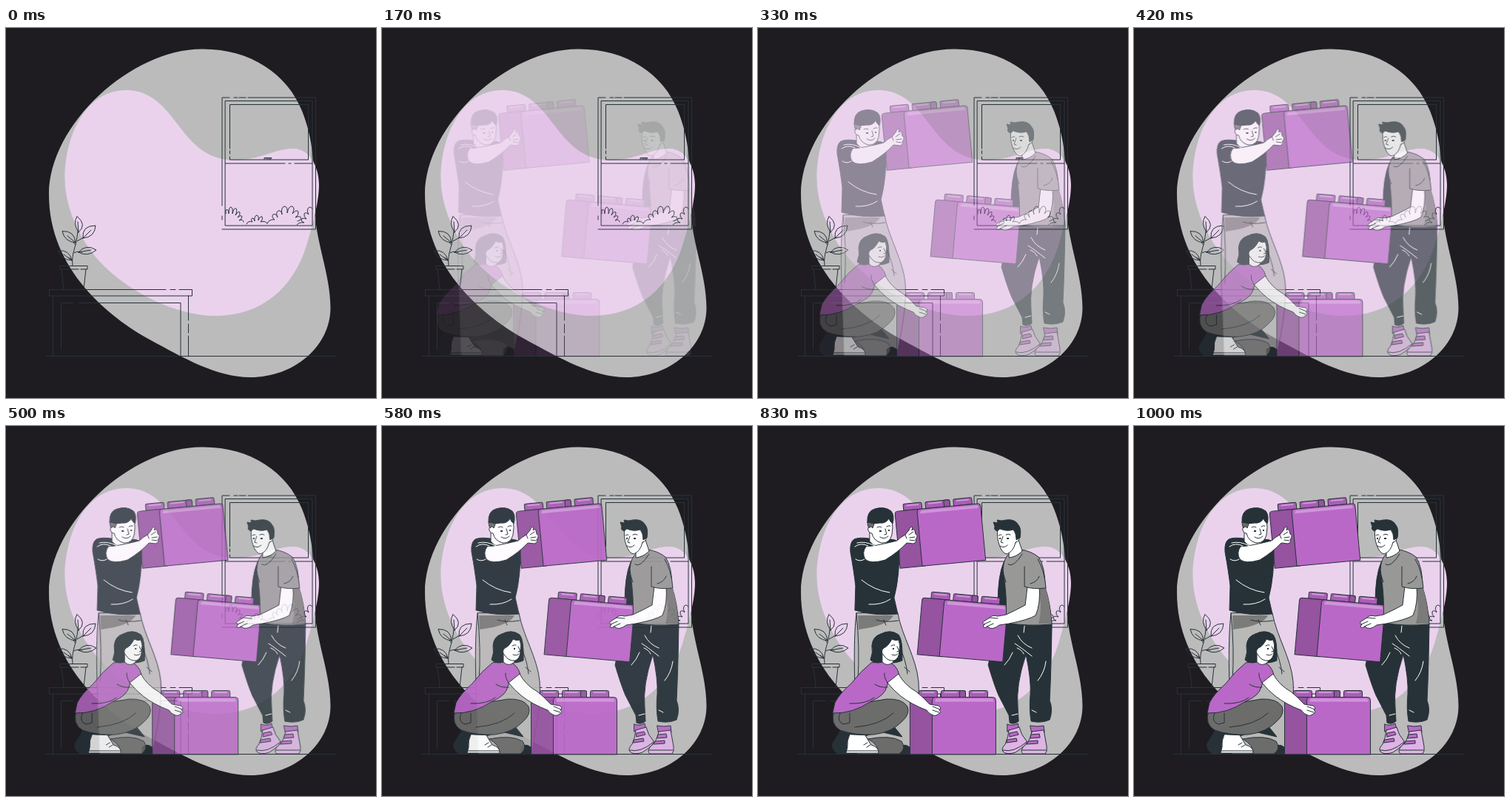
An HTML page for the animation above (1040 ms loop, 500 by 500 pixels).

```html
<!DOCTYPE html>
<html lang="en">
<head>
<meta charset="utf-8">
<title>Building together</title>
<style>
html, body { margin: 0; height: 100%; overflow: hidden; background: #1e1c21 }
svg { display: block; width: 100%; height: 100% }
g { stroke-linecap: round; stroke-linejoin: round }
.ink { fill: none; stroke: #263238 }
.art { stroke: #263238; fill: none }
.dark { fill: #263238 }
.skin { fill: #fff }
.purple { fill: #ba68c8 }
.deep { fill: #9553a0 }
.stud { fill: #a85eb5 }
.lilac { fill: #ddb4e4 }
.pale { fill: #b9b9b8 }
.grey { fill: #989897 }
.shade { fill: #7b7b7a; stroke: none }
.slate { fill: #6c6c6b }
.fold { fill: none; stroke: #fff }
.shine { fill: #cf95d9; stroke: none }
.dot { fill: #263238; stroke: none }
</style>
</head>
<body>
<svg viewBox="0 0 500 500">
<defs>
  <g id="brick">
    <path class="stud" d="M12 0v-7q0-2 2-2h21q2 0 2 2v7zM42 0v-7q0-2 2-2h29q2 0 2 2v7zM80 0v-7q0-2 2-2h21q2 0 2 2v7z"/>
    <path class="deep" d="M67 0v-7q0-2 2-2h4q2 0 2 2v7z"/>
    <path class="shine" d="M16-7.500h17v2h-17zM46-7.500h18v2h-18zM84-7.500h17v2h-17z"/>
    <path class="deep" d="M0 77V4q0-4 4-4h30v77z"/>
    <path class="purple" d="M30 77V4q0-4 4-4h78q4 0 4 4v73z"/>
    <path class="shine" d="M34 6q0-4 3-4h73q3 0 3 4z"/>
  </g>
</defs>

<path fill="#bbb" d="M265 28.500C330 28 380 62 400 112C416 152 417 190 417 235C416 285 438.500 330 438.500 378C438.500 430 390 472 330 472C285 472 240 446 194 421C140 391 58 327 58 225C58 130 170 28 265 28.500Z"/>
<path fill="#ead2ed" d="M162 84C232 84 232 178 308 178.500C345 178.500 362 163 388 163C412 163 423 190 423 212C423 235 414 268 406 294C388 352 345 389 283 389C230 389 165 357 126 315C98 284 79.500 240 79.500 203C79.500 150 105 84 162 84Z"/>

<g class="ink">
  <path d="M54 443.500H446"/>
  <!-- table -->
  <path d="M216 353.500H58.500V362H251.500V353.500H234M222 353.500h7M63.500 362v81M74.500 435V371.500H91M98 371.500H236V443M246.500 362v33M246.500 400v12M246.500 416v27"/>
  <!-- plant -->
  <path d="M73 326V321.500h37V326H101M73 326H84M87 326h11M75 326l3 27M108 326l-3 27M90 321C88 303 95 298 97 275M89 313l-5-3M92 304Q96 301 103 303M94 293l-3-3M96 288l9-5"/>
  <path d="M98 276Q90 264 96 254.500Q110 266 98 276ZM98 276L97 262M94 290Q79 289 76 274.500Q93 274 94 290ZM94 290L83 281M104 284Q102 267 121 267Q120 283 104 284ZM104 284L115 273M98 303Q108 291 122 300Q110 310 98 303ZM98 303L115 300M89 314Q74 313 70 301Q86 299 89 314ZM89 314L78 306"/>
  <!-- window -->
  <path d="M292 240V94H302M308 94h5M315 94h9M327 94H418.500V272H292M292 254v5M296.500 98.500H414V267H296.500ZM302.500 163V103.500H408.500V178H302.500V174M302.500 166v4M296.500 183H377M382 183h3M390 183H414M349 178V175.500h10L357 178M351 177h6"/>
  <!-- bushes -->
  <path d="M297 251v-5q4-2 4 5q0-9 3-9q3 1 2 9q2-9 5-7q2 3-1 9q4-6 6-4q1 3-3 7q5-4 6-1q0 3-4 5q6-2 6 2M325 265q2-5 8-3q-3-4 0-5q3 0 3 4q-1-7 3-8q3 1 2 7q2-6 5-5q2 3-2 7q6-2 9 2M353 264q3-6 10-5q-5-4-2-7q4-2 6 4q-3-7 1-9q4-1 5 5q-2-9 3-11q5 0 4 9q2-10 7-9q4 3 0 10q5-6 8-3q1 5-4 8q7-3 8 1q0 3-5 4M414 244q-4-4-6 0q-2 3 1 8q-4-4-6-1q-1 4 3 7q-6-2-7 1q0 3 4 4q-7-1-10 3"/>
</g>

<g class="art" data-from="-30">
  <!-- standing on the left -->
  <path class="pale" d="M131 253C126 300 129 350 132 443H203C211 408 217 370 215 345C212 313 193 285 187 253Z"/>
  <path class="shade" d="M133 256H181Q174 270 134 275Z"/>
  <path d="M131 253Q136 300 133 345M158 262q10 4 30 1M168 262l3 7M196 326l7 6M190 300q8 16 10 35"/>
  <path class="dark" d="M190 443V434Q197 428 204 435V443Z"/>
  <use href="#brick" transform="translate(183 115.500) rotate(-5.400)"/>
  <path class="dark" d="M148 152Q135 150 128 153Q122 157 123 170Q128 198 130 216L129 249Q155 257 187 254L182 232Q190 203 189 157Q183 153 177 153Z"/>
  <path class="skin" d="M149 143V156Q157 166 168 162Q174 160 173 152Z"/>
  <path class="skin" d="M151 128Q148 132 150 136Q146 136 147 141Q149 146 152 145Q154 155 165 158Q176 159 179 147Q181 137 179 126Q166 120 151 128Z"/>
  <path class="slate" d="M147 126Q145 133 148 138Q150 134 153 138L156 130L153 122Z"/>
  <path class="dark" d="M146 130Q145 115 156 112Q169 108 178 115Q183 121 180 132Q176 129 175 125Q171 132 163 131Q155 133 146 130Z"/>
  <path d="M159 137q4-2 6 0M172 136q3-2 5-1M170 139l2 7-3 1M163 150q6 4 11-1"/>
  <path class="dot" d="M162 141h3v2h-3zM174 140h2v2h-2z"/>
  <path class="skin" d="M144 163Q138 171 143 180Q150 187 170 181Q188 170 199 158L208 159Q213 157 211 154L213 150Q214 147 211 146L210 141Q208 138 206 141L207 137Q204 135 202 141L197 147Q191 150 186 155Q166 160 153 162Z"/>
  <path d="M203 151l7-1M203 154l7 1M202 147l6-4M197 147l2 5"/>
  <path class="fold" d="M129 163q8-6 18-1M132 158q11-3 24 4M130 180q6 4 12 0M138 208q17 14 38 17M148 241q17 1 29-7"/>
</g>

<g class="art" data-from="30">
  <!-- standing on the right -->
  <path class="dark" d="M334 184Q326 202 326 240L338 246L340 190Z"/>
  <path class="dark" d="M337 265L331 286Q314 312 313 323Q321 350 327 364L341 391L342 401Q348 404 354 399L353 381Q350 350 364 309Q371 342 370 362Q368 382 371 399Q385 402 396 397Q401 383 396 371Q398 330 399 267Z"/>
  <path class="fold" d="M362 270l-1 9M353 283q6 12 19 17M349 294q8 5 23 17M346 306q-4 10-11 17M352 300q7 3 9 8M391 318q-2 15-11 26M345 391l8-2M372 384l6 3"/>
  <path class="purple" d="M339 403q7 3 14-1l2 9-16 2zM370 405q9 2 18 0l1 9-17 1z"/>
  <path class="lilac" d="M341 411L355 407Q357 417 365 426Q367 430 350 441Q338 445 333 440Q330 436 336 430Q340 421 341 411ZM372 413L388 411L392 433Q393 440 390 443H360Q356 440 360 434Q370 426 372 413Z"/>
  <path class="purple" d="M342 415l10-2 2 4-12 3zM339 424l12-2 1 4-14 2zM371 417l11-1 1 5-13 1zM368 426l12-1v4l-15 1z"/>
  <path d="M333 438q14 4 32-11M359 438h32"/>
  <use href="#brick" transform="translate(223.800 232) rotate(5)"/>
  <path class="grey" d="M341 173Q334 178 333 194Q339 232 337 266Q366 271 399 268Q397 239 390 218Q390 190 381 177Q371 169 357 167Z"/>
  <path class="shade" d="M378 215L391 220Q397 240 398 267H381Q388 241 378 215Z"/>
  <path class="skin" d="M341 168V178Q351 177 359 169L354 154Z"/>
  <path class="skin" d="M326 137Q324 150 328 161Q332 172 338 173Q347 170 350 157Q355 156 355 151Q354 147 351 148L350 138Q338 132 326 137Z"/>
  <path class="dark" d="M325 142Q320 140 322 136L320 130L326 131L325 127Q331 129 337 127Q349 125 354 134Q358 139 356 151L351 154Q351 145 347 140Q338 143 329 139Z"/>
  <path d="M327 148q2-2 4-1M337 147q3-2 6 0M333 149l-3 8 3 1M329 162q5 4 10-1"/>
  <path class="dot" d="M328 151h2v2h-2zM338 151h3v2h-3z"/>
  <path class="skin" d="M366 216L363 242Q350 249 337 255L326 257Q318 255 315 259L307 264Q304 267 308 268L306 271Q307 274 312 271Q318 277 328 269L341 267Q367 262 377 256Q384 240 382 217Z"/>
  <path d="M307 268l9-4M311 271l9-4M315 259l11 1"/>
  <path class="grey" d="M362 190L362 217Q374 221 391 219Q389 195 380 180"/>
  <path d="M382 203q-3 8-12 10M340 187q7 5 19-14M334 202l3 9"/>
</g>

<g class="art" data-from="-30">
  <!-- crouching -->
  <use href="#brick" transform="translate(203.500 366.500)"/>
  <path class="dark" d="M112 408L99 429Q97 437 106 443H120L126 424L163 413L193 420L177 400Z"/>
  <path class="slate" d="M147 423Q177 417 192 426Q199 436 189 443H160Q163 432 147 423Z"/>
  <path class="skin" d="M122 417Q118 425 119 434L117 442H161Q162 434 151 431L143 418Z"/>
  <path d="M118 439h43M141 431l5-3M145 434l5-3"/>
  <path class="slate" d="M101 384Q95 403 109 411Q128 418 154 417Q179 414 193 399Q204 389 200 379Q193 368 172 369Q147 372 121 380Z"/>
  <path d="M109 388q-5 12 5 15l8-2V388M129 407q35-3 52-19"/>
  <path class="purple" d="M151 320Q137 331 124 348Q108 362 102 374L99 388Q126 389 151 372Q170 364 172 352L174 347L189 336Q185 321 173 319Z"/>
  <path class="skin" d="M173 347L188 335Q196 350 212 359Q222 367 230 376L242 378Q247 381 243 384Q247 387 242 389Q238 393 233 390Q229 389 226 384Q205 376 191 365Q181 357 173 347Z"/>
  <path d="M234 379l10 4M234 384l9 3M173 347q-5-8-4-13M122 375q22 1 33-8M156 349q7 5 17 4"/>
  <path class="dark" d="M164 281Q177 274 188 282Q194 289 193 317Q182 322 166 319Q156 322 150 316Q154 306 152 297Q153 284 164 281Z"/>
  <path class="skin" d="M166 308V319Q173 326 181 319V314Z"/>
  <path class="skin" d="M179 288Q174 298 168 300Q163 305 168 310Q173 318 182 317Q189 314 189 304Q191 296 188 289Q184 291 179 288Z"/>
  <path d="M178 297q3-2 5-1M186 298l3 6-3 1M179 309q5 2 8-1"/>
  <path class="dot" d="M180 300h2v2h-2z"/>
</g>
</svg>
<script>
const LOOP = 1040, FPS = 24;
const groups = document.querySelectorAll('[data-from]');
const curve = (a, b, s) => 3 * (1 - s) ** 2 * s * a + 3 * (1 - s) * s * s * b + s ** 3;

// cubic-bezier(.36, -.01, .5, 1.38), solved by bisection
function ease(x) {
  if (x >= 1) return 1;
  let lo = 0, hi = 1;
  for (let i = 0; i < 24; i++) {
    const mid = (lo + hi) / 2;
    if (curve(.36, .5, mid) < x) lo = mid; else hi = mid;
  }
  return curve(-.01, 1.38, lo);
}

function draw(now) {
  const step = Math.floor((now % LOOP + 5) * FPS / 1000);
  const shown = step < 2 ? 0 : ease(step / FPS + .035);
  for (const g of groups) {
    g.setAttribute('opacity', Math.min(1, shown));
    g.setAttribute('transform', `translate(${g.dataset.from * (1 - shown)})`);
  }
}

const start = performance.now();
function tick() {
  draw(performance.now() - start);
  requestAnimationFrame(tick);
}
tick();
</script>
</body>
</html>
```
